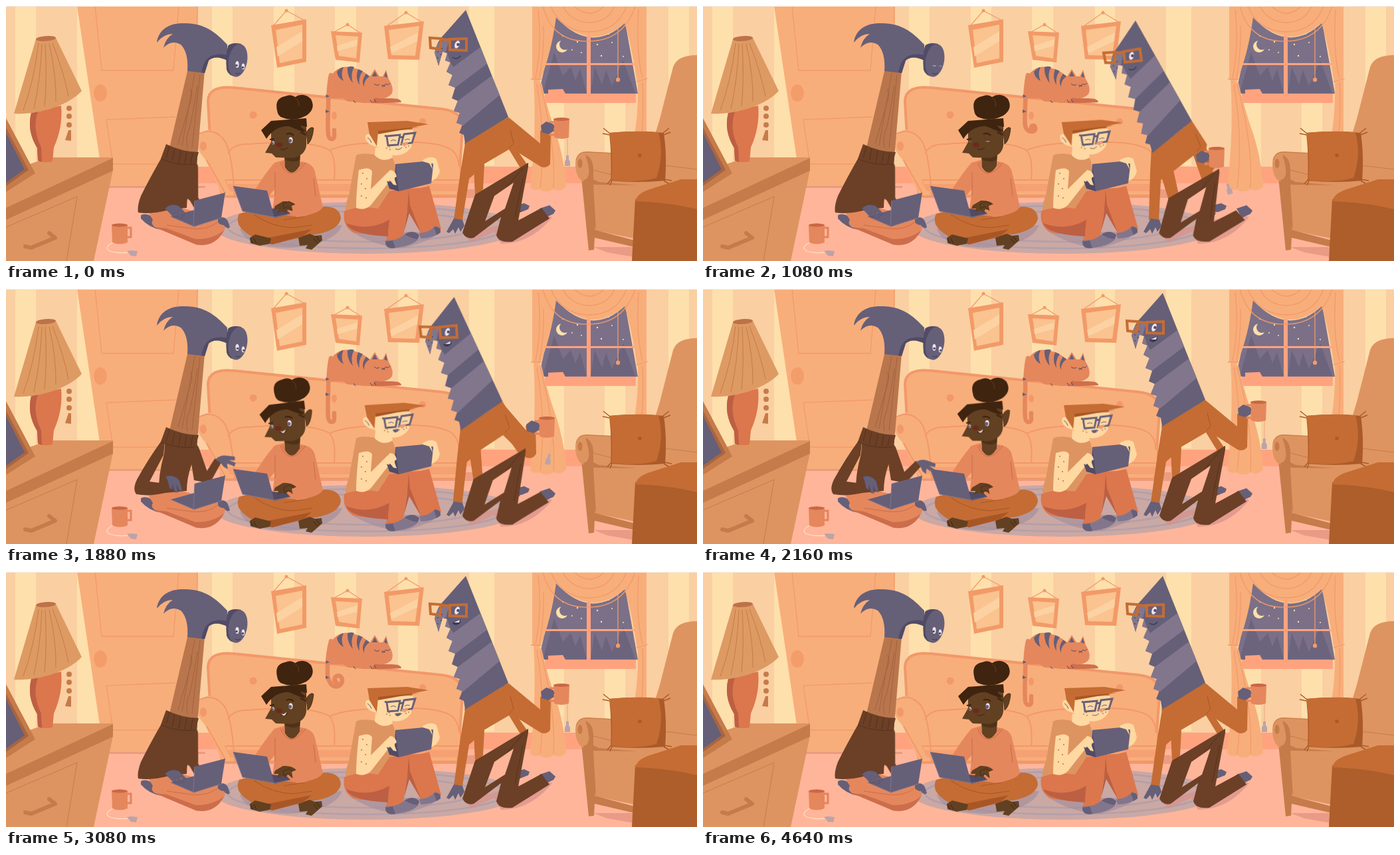
An HTML page that plays this animation: 1040x384 px, repeating every 4.8 s.

```html
<!DOCTYPE html>
<html lang="en">
<head>
<meta charset="utf-8">
<title>Evening in the living room</title>
<style>
html, body { margin: 0; width: 100%; height: 100%; overflow: hidden; background: #facfa1; }
svg { display: block; width: 100vw; height: 100vh; }
.p { fill: #665f78 } .pl { fill: #82768d } .pd { fill: #514b66 }
.br { fill: #6b4026 } .or { fill: #c46c33 } .co { fill: #dc764c } .cl { fill: #e5875c }
.tan { fill: #de9460 } .td { fill: #c67b4a } .sk { fill: #ffd8a2 }
.dk { fill: #624022 } .hair { fill: #3f2410 } .door, .sofa { fill: #f8ae7a }
.ln { fill: none; stroke: #f29a6b; stroke-width: 1.3 }
.thin { fill: none; stroke-width: 1 }
.w { fill: #eee4ef }

.lean, .hip, .prop, .flap, .arm, .cup, .cord, .grip, .tail, .nod, .tilt, .sleeve, .reach, .fore,
.paw, .tap, .blink, .wink, .talk, .smile, .grin, .look { animation: 4.8s infinite ease-in-out; }

.lean { transform-origin: 791px 323px; animation-name: lean; }
@keyframes lean { 0%, 13%, 43%, 100% { transform: none } 22%, 34.6% { transform: rotate(-7.6deg) } }
.hip { transform-origin: 750px 350px; animation-name: hip; }
@keyframes hip { 0%, 13%, 43%, 100% { transform: none } 22%, 34.6% { transform: skewX(5deg) scaleY(.92) } }
.prop { animation-name: prop; }
@keyframes prop {
  0%, 13%, 43%, 100% { d: path("M691 207L718 236L712 247L697 260L687 322L674 321L684 250Z") }
  22%, 34.6% { d: path("M675 214L708 236L703 250L689 262L686 324L671 322L673 250Z") }
}
.flap { animation-name: flap; }
@keyframes flap {
  0%, 13%, 43%, 100% { d: path("M704 240L720 238L718 276L706 289Z") }
  22%, 34.6% { d: path("M687 247L706 238L716 284L701 293Z") }
}
.arm { animation-name: arm; }
@keyframes arm {
  0%, 13%, 44%, 100% { d: path("M745 172L757 168L804 207L804 188L820 188L819 238Q814 245 805 242L757 212L740 200Z") }
  22.4% { d: path("M725 178L733 170L763 225L757 222L764 218L768 258Q764 270 752 265L738 225L720 210Z") }
  27%, 34.6% { d: path("M725 178L733 170L774 238L755 236L756 250L755 268Q748 275 738 268L738 235L720 210Z") }
  39.2% { d: path("M735 176L745 169L783 213L782 206L797 208L798 248Q793 257 783 254L748 220L730 205Z") }
}
.cup { animation-name: cup; }
@keyframes cup {
  0%, 13%, 44%, 100% { transform: none } 22.4% { transform: translate(-63px, 44px) }
  27%, 34.6% { transform: translate(-88px, 49px) } 39.2% { transform: translate(-22px, 24px) }
}
.cord { transform-origin: 845px 198px; animation-name: cord; }
@keyframes cord {
  0%, 13%, 46%, 100% { transform: none } 18% { transform: rotate(-20deg) } 22.4% { transform: rotate(-16deg) }
  27%, 34.6% { transform: rotate(10deg) } 39.2% { transform: rotate(11deg) }
}
.grip { animation-name: grip; }
@keyframes grip { 0%, 22.4%, 39.2%, 100% { transform: none } 27%, 34.6% { transform: translateX(20px) } }

.tail { animation-name: tail; }
@keyframes tail {
  0%, 12%, 30%, 50%, 80%, 100% { d: path("M489 104C485 122 485 140 485 156C484 176 484 184 485 194C486 203 496 202 494 193C494 191 494 189 494 187") }
  22%, 24%, 53.5% { d: path("M489 104C485 122 485 140 485 152C484 172 484 176 485 181C488 192 502 191 500 183C498 178 494 180 494 184") }
  62%, 68% { d: path("M489 104C485 120 484 130 484 141C484 152 483 158 486 163C491 178 507 173 506 162C503 149 488 160 498 167") }
}

.nod { transform-origin: 430px 242px; animation-name: nod; }
@keyframes nod { 0%, 35.5%, 47%, 100% { transform: none } 38.5%, 43% { transform: rotate(-2.6deg) } }
.tilt { transform-origin: 580px 225px; animation-name: tilt; }
@keyframes tilt { 0%, 13%, 47%, 100% { transform: none } 21%, 41% { transform: translate(-3px, -1px) rotate(-1.5deg) } }

.sleeve { animation-name: sleeve; }
@keyframes sleeve {
  0%, 24%, 62%, 100% { d: path("M240 220L232 232Q216 260 203 286Q197 302 199 311Q220 314 245 307L268 301L264 270L266 232Z") }
  29%, 58.5% { d: path("M240 220L233 230Q214 256 197 287Q190 302 196 309Q218 313 243 306L240 293L216 290L237 250Z") }
}
.reach { transform-origin: 279px 237px; animation-name: reach; }
@keyframes reach { 0%, 24%, 50%, 100% { transform: rotate(19deg) } 29%, 45% { transform: none } }
.fore { transform-origin: 299px 283px; animation-name: fore; }
@keyframes fore {
  0%, 24%, 51%, 100% { transform: rotate(75deg) } 29%, 35% { transform: none }
  38.5%, 43% { transform: translate(3px, 1px) rotate(-27deg) }
}
.paw { transform-origin: 252px 305px; animation-name: paw; }
@keyframes paw {
  0%, 3%, 6%, 9%, 12%, 24%, 62%, 65%, 68%, 100% { transform: none }
  1.5%, 4.5%, 7.5%, 10.5%, 63.5%, 66.5% { transform: translateY(-2px) rotate(-4deg) }
  28.5%, 37%, 43%, 58.5% { transform: translate(0, -16px) rotate(30deg) }
  40% { transform: translate(0, -17px) rotate(26deg) }
}
.key { animation: key .32s infinite step-end; }
.key.b { animation-delay: -.16s; }
@keyframes key { 0%, 100% { transform: none } 25% { transform: translate(1px, -1px) } 50% { transform: translate(0, -2px) } }
.tap { transform-origin: 576px 262px; animation-name: tap; }
@keyframes tap { 0%, 8%, 12%, 50%, 54%, 58%, 91%, 95%, 100% { transform: none } 10%, 52%, 56%, 93% { transform: rotate(-9deg) } }

.blink { transform-box: fill-box; transform-origin: 50% 60%; animation-name: blink; }
@keyframes blink { 0%, 21%, 24%, 86%, 89%, 100% { transform: none } 22%, 23%, 87%, 88% { transform: scaleY(.12) } }
.wink { transform-box: fill-box; transform-origin: 50% 60%; animation-name: wink; }
@keyframes wink { 0%, 6%, 9%, 84%, 87%, 100% { transform: none } 7%, 8%, 85%, 86% { transform: scaleY(.12) } }
.look { animation-name: look; }
@keyframes look { 0%, 25%, 50%, 100% { transform: none } 28%, 43% { transform: translateX(1.5px) } }
.talk, .smile, .grin { opacity: 0; animation-timing-function: step-end; }
.talk { animation-name: talk; }
@keyframes talk { 0%, 32%, 38%, 43% { opacity: 0 } 28%, 35%, 40% { opacity: 1 } }
.smile { animation-name: smile; }
@keyframes smile { 0%, 78% { opacity: 0 } 28% { opacity: 1 } }
.grin { animation-name: grin; }
@keyframes grin { 0%, 82% { opacity: 0 } 38% { opacity: 1 } }
</style>
</head>
<body>
<svg viewBox="0 0 1040 384" preserveAspectRatio="none">
<!-- wall and floor -->
<path fill="#facfa1" d="M0 0H1040V384H0Z"/>
<path fill="#fee0ac" d="M14 0H45V240H14ZM107 0H141V242H107ZM310 0H341V240H310ZM403 0H434V240H403ZM495 0H527V240H495ZM590 0H620V240H590ZM697 0H735V240H697ZM808 0H840V240H808ZM901 0H932V240H901ZM997 0H1028V240H997Z"/>
<path fill="#ffa37f" d="M0 242H1040V268H0Z"/>
<path fill="#ffb59a" d="M0 267H1040V384H0Z"/>

<!-- door -->
<path class="door" d="M107 0H289L284 271H147Z"/>
<path fill="#e99b7d" d="M147 271H300V274H147Z"/>
<path class="ln" d="M134 0L144 97H252L260 0M235 238H161L151 171L255 167M288 0L284 271"/>
<ellipse cx="142" cy="131" rx="10" ry="13" fill="#f39d6b"/>

<!-- pictures -->
<path class="ln" d="M402 30L422 7L450 22M492 40L514 28L534 41M572 31L602 10L627 25"/>
<g fill="#f29a68">
  <circle cx="422" cy="7" r="2.5"/><circle cx="514" cy="28" r="2.5"/><circle cx="602" cy="10" r="2.5"/>
  <path d="M399 29L452 20V84L408 93ZM489 38L536 40L532 85L496 81ZM569 30L629 23L622 81L575 80Z"/>
</g>
<path fill="#fac38f" d="M406 36L446 28V79L412 86ZM496 44L530 46L527 79L501 75ZM576 36L622 30L616 75L580 74Z"/>
<path fill="#fcd2a2" d="M407 62L446 38V53L409 76ZM498 60L529 50L528 60L499 68ZM578 62L620 40L619 53L580 71Z"/>

<!-- window -->
<path fill="#7b7087" d="M827 16Q880 74 932 25L951 132H802Z"/>
<path fill="#6c647d" d="M808 131L825 70L838 105L850 92L857 112L864 95L874 131ZM880 131L886 92L897 118L903 96L912 120L929 82L947 131Z"/>
<circle cx="837" cy="61" r="9" fill="#fee0ac"/><circle cx="841" cy="58" r="8" fill="#7b7087"/>
<g fill="#fee0ac"><circle cx="838" cy="45" r="1"/><circle cx="852" cy="66" r="1"/><circle cx="860" cy="54" r="1.2"/><circle cx="866" cy="70" r="1"/><circle cx="890" cy="58" r="1.2"/><circle cx="896" cy="75" r="1.2"/><circle cx="912" cy="55" r="1"/><circle cx="929" cy="76" r="1"/><circle cx="907" cy="42" r="1"/></g>
<path fill="#ffa37f" d="M874 44H880V132H874ZM806 86H947V89H806ZM811 132H948V146H811ZM816 126L838 125L842 132H816Z"/>
<path class="ln" d="M921 34V108"/><circle cx="921" cy="111" r="3.2" fill="#f29a6b"/>
<g class="door">
  <path d="M792 0H964V112L950 116Q942 60 931 26Q880 70 828 17Q820 75 803 114L792 110Z"/>
  <path d="M794 110L806 116Q816 160 829 195Q841 235 843 272Q834 281 824 276Q812 283 803 276Q795 279 789 273Q799 190 794 110Z"/>
  <path d="M951 112L964 110V241H936Q953 180 951 112Z"/>
</g>
<path class="ln" d="M808 0Q822 55 878 53Q930 52 947 0M820 0Q835 38 878 39Q920 38 934 0M838 0Q850 24 878 25Q906 24 916 0M855 0Q865 10 878 11Q892 10 900 0M801 5Q807 60 797 108M809 30Q810 70 803 108M952 5Q948 70 958 108M790 110H807M949 114L966 109M799 118Q813 200 804 274M804 118Q828 210 824 274M958 115Q962 190 948 241"/>

<!-- sofa -->
<path fill="#ec9c80" d="M330 276H705V289H330Z"/>
<path class="sofa" stroke="#f2986a" stroke-width="4" d="M308 215L304 143Q305 119 343 123L655 155Q688 158 687 184L680 286H326Z"/>
<path class="sofa" d="M287 200Q300 178 325 192Q343 205 344 285H326L300 231Q285 215 287 200Z"/>
<path fill="#f5a173" d="M328 261H682V279H337Z"/>
<path class="sofa" d="M332 262Q327 214 360 208Q430 201 495 211Q580 200 650 207Q678 210 683 240V268H332Z"/>
<path fill="none" stroke="#f2986a" stroke-width="2" d="M334 222Q342 207 365 208Q455 201 485 216Q497 224 494 262M488 217Q510 207 560 206Q645 201 670 216Q681 224 682 242M288 194Q311 181 327 200Q340 215 344 285M302 232L330 282M332 262H683"/>
<g fill="#f2986a"><ellipse cx="297" cy="211" rx="5" ry="7"/><circle cx="372" cy="164" r="5.5"/><ellipse cx="494" cy="165" rx="4" ry="6"/><circle cx="627" cy="174" r="5"/></g>

<!-- rug -->
<ellipse cx="543" cy="334" rx="229" ry="39" fill="#caa8a4"/>
<g class="thin" stroke="#b29faa" style="stroke-width:2.5"><ellipse cx="543" cy="333" rx="209" ry="32"/><ellipse cx="543" cy="332" rx="164" ry="23"/></g>
<path fill="#a28c9a" opacity=".6" d="M352 335Q360 364 430 364Q495 358 506 330ZM520 340Q560 364 600 364Q650 350 650 340ZM285 360Q318 361 330 335Z"/>
<path fill="#d9908a" opacity=".7" d="M690 345L700 356L735 340L745 358Q790 358 822 318L805 312Z"/>

<!-- cat -->
<path fill="#cf6f4c" d="M512 143Q550 148 595 145Q595 138 575 139L520 136Z"/>
<path class="cl" d="M485 138Q482 98 507 92Q526 89 548 106L555 95L562 106H567L572 96L576 110Q585 124 580 133Q570 142 556 138L550 146Q515 146 507 139Q490 140 485 138Z"/>
<path class="p" d="M498 99Q503 93 508 92Q503 102 508 113Q499 108 498 99ZM514 92Q520 90 524 92Q518 102 522 116Q513 106 514 92ZM530 95L537 98Q530 107 532 119Q525 108 530 95ZM542 102L547 106Q538 112 539 122Q534 113 542 102ZM551 106L555 98L559 106ZM569 106L572 99L574 108Z"/>
<path class="thin" stroke="#514b66" d="M554 117Q558 121 562 118M571 117Q575 120 578 116M565 119L571 121M571 118L566 122M523 142L526 146M548 141L551 146M554 140L557 145"/>
<path class="tail" fill="none" stroke="#e5875c" stroke-width="6.5" stroke-linecap="round" d="M489 104C485 122 485 140 485 156C484 176 484 184 485 194C486 203 496 202 494 193C494 191 494 189 494 187"/>
<path class="p" d="M481.500 133L487 136L481.500 138ZM481 156L487 159L481 161Z"/>

<!-- hammer -->
<g>
  <path fill="#b9764c" d="M274 94L299 97L288 228L244 222Z"/>
  <path class="thin" stroke="#a36340" d="M284 101L265 210M292 103L280 213M277 125Q282 132 278 142L259 208M288 120Q282 160 276 185Q270 196 273 214"/>
  <path class="p" d="M227 55C230 34 248 25 270 26C299 26 316 40 333 58L333 82Q315 73 305 82L299 101L273 98Q275 70 263 58Q249 50 237 63Q240 49 251 42Q237 42 227 55Z"/>
  <path class="pd" d="M333 74L333 82Q315 73 305 82L299 101L294 100Q298 78 312 74Q323 71 333 74Z"/>
  <path class="pd" d="M334 60Q340 54 354 57L347 106Q335 106 332 96Q330 76 334 60Z"/>
  <ellipse class="p" cx="349" cy="82" rx="14" ry="25" transform="rotate(10 349 82)"/>
  <g class="blink"><ellipse class="w" cx="348" cy="88" rx="2.600" ry="5"/><ellipse class="w" cx="357" cy="91" rx="2.300" ry="4.500"/><g class="look"><circle class="pd" cx="347" cy="89.500" r="1.800"/><circle class="pd" cx="356.500" cy="92.500" r="1.700"/></g></g>
  <path class="thin" stroke="#3f3a53" d="M345 101Q349 104 353 101"/>
  <ellipse class="talk w" cx="349" cy="102" rx="2.300" ry="1.500"/>

  <g class="reach">
    <path class="br" d="M274 231Q287 229 291 241L305 281L300 291L283 288Z"/>
    <g class="fore">
      <path class="br" d="M294 280L323 263L330 272L302 291Q294 292 294 280Z"/>
      <path class="p" d="M323 265Q332 261 342 268L351 274L349 279L341 275L348 283L344 287L336 278L333 286L329 280L328 273Z"/>
    </g>
  </g>
  <path class="p" d="M203 315Q214 310 224 322L234 337Q215 334 203 320Z"/>
  <path class="cl" d="M213 309Q245 296 285 310L325 319Q335 327 326 342Q308 365 285 359L224 333Q217 328 221 322Z"/>
  <path fill="#cc6d4b" d="M224 333L286 359Q315 364 328 338Q310 352 285 351L242 335Z"/>
  <path class="thin" stroke="#cc6d4b" d="M242 330L279 335Q302 338 318 326"/>
  <path class="p" d="M319 320Q329 315 334 324L337 333Q333 337 328 330Q323 330 319 326Z"/>
  <path class="br" d="M240 222L288 228Q288 242 280 262Q272 284 272 304L230 308Q229 280 238 248Z"/>
  <path class="sleeve br" d="M240 220L232 232Q216 260 203 286Q197 302 199 311Q220 314 245 307L268 301L264 270L266 232Z"/>
  <path class="br" d="M241 208Q266 220 290 220L285 238Q257 240 233 230Z"/>
  <path class="thin" stroke="#573219" d="M246 211L241 229M254 215L250 233M263 218L260 236M272 220L269 237M281 221L278 237M233 230Q257 241 285 238"/>
  <path class="p" d="M248 317L291 305L323 319L283 332Z"/>
  <path class="p" d="M284 293L330 281L324 319L282 332Z"/>
  <path class="thin" stroke="#82768d" d="M248 317L283 332L324 319M284 293L282 331"/>
  <path class="paw p" stroke="#514b66" stroke-width=".6" d="M239 305Q248 296 260 301L271 313L267 315L259 309L266 318L262 320L253 311L257 318L252 318L245 310Z"/>
</g>

<!-- woman -->
<g>
  <path class="cl" d="M404 236L421 231L443 234Q462 236 465 250L477 303Q474 316 440 318L400 318L405 275L390 293L374 278Q390 252 404 236Z"/>
  <path class="thin" stroke="#c86b49" d="M405 250V285M463 260L466 288L446 295M416 235Q427 260 447 236M413 236Q427 268 451 236"/>
  <path class="dk" d="M419 222H443L442 240Q431 260 420 243Z"/>
  <path class="hair" opacity=".55" d="M419 229L443 220L442 232Q431 237 419 231Z"/>
  <g class="nod">
    <path class="hair" d="M408 157Q404 139 420 136Q429 132 435 137Q448 129 459 140Q467 155 452 165Q432 175 416 168Q409 166 408 157Z"/>
    <path class="thin" stroke="#624022" d="M435 138Q443 145 440 151"/>
    <path class="dk" d="M399 178H452V210Q450 225 432 229L406 228L400 222L390 221L399 205Z"/>
    <path class="dk" stroke="#3f2410" stroke-width=".8" d="M452 190Q459 180 463 184Q461 203 454 208Z"/>
    <path class="hair" d="M384 187L399 173L452 169L453 182L443 180L450 191L426 181Q405 180 392 200Z"/>
    <path class="thin" stroke="#3f2410" style="stroke-width:2" d="M422 193Q428 190 433 195M397 201L404 200M444 184L451 188M443 190L451 194"/>
    <g class="blink"><ellipse class="w" cx="428.500" cy="202" rx="3" ry="4.500"/><ellipse class="w" cx="402" cy="206" rx="2" ry="2.600"/><circle class="p" cx="427.500" cy="203" r="2.700"/><circle class="p" cx="401.500" cy="206.500" r="1.800"/></g>
    <ellipse cx="411" cy="209" rx="5" ry="3.500" fill="#6c2a1a"/>
    <path class="thin" stroke="#3f2410" d="M413 215Q418 218 424 213"/>
    <path class="smile w" d="M414 213Q418 216 422 211Q421 217 417 216Z"/>
  </g>
  <path class="or" d="M351 313Q375 304 410 314L447 318L479 302Q503 302 504 320Q500 340 458 345L400 359Q361 348 350 329Q347 319 351 313Z"/>
  <path fill="#a95626" d="M400 348L460 336L448 346L401 359L374 351Z"/>
  <path class="thin" stroke="#a95626" d="M373 314Q400 333 432 334L461 330M418 322L450 317"/>
  <path class="dk" d="M375 344L399 350L397 358L382 361L368 357L367 349ZM440 349L457 343L465 346L475 345L476 353L460 367L451 365L454 360L442 361Z"/>
  <path class="thin" stroke="#3f2410" d="M368 350L372 358M373 350L377 358M467 347L472 354M463 350L469 357"/>
  <path class="p" d="M342 271L393 278L404 318L356 309Z"/>
  <path class="pd" d="M400 305L423 308L428 313L404 319Z"/>
  <path class="thin" stroke="#82768d" d="M342 271L356 309L404 318L428 313"/>
  <path class="key dk" d="M405 301L417 294Q430 293 437 300L434 309L424 307L421 312L416 309L408 312L410 306L403 306Z"/>
  <path class="key b dk" stroke="#3f2410" stroke-width=".6" d="M417 300L426 296L435 302L431 310L424 304L418 307Z"/>
  <path class="cl" d="M430 301L467 286L477 301Q475 313 437 318L432 312Z"/>
</g>

<!-- reader -->
<g>
  <path class="tan" d="M527 225Q536 220 555 224H577Q587 232 585 249L580 302L512 318Q508 305 516 285Z"/>
  <path class="sk" d="M556 213L580 217L582 228Q567 237 555 225Z"/>
  <path class="co" d="M509 309Q530 300 560 305L577 279L600 275L624 274L637 271L655 336L626 345L604 307L596 358L571 356L575 340Q545 347 521 340Q506 330 509 309Z"/>
  <path fill="#bd5f43" d="M575 340L577 322Q545 340 512 327Q518 344 575 347ZM606 278L604 308L599 340L607 312L624 341L608 300Z"/>
  <path class="pl" d="M571 353Q590 354 601 343Q613 336 622 345Q622 360 582 365Q570 365 571 353ZM622 342Q638 341 646 331Q654 333 654 341Q642 350 624 350Z"/>
  <path class="p" d="M571 355L582 353L586 364Q571 367 571 355ZM600 344Q612 336 622 345L619 351Q610 350 600 344ZM644 333Q655 331 654 341L648 345Z"/>
  <path class="sk" d="M531 247Q547 241 551 249L549 276L574 251L588 256L587 265L575 267L549 300Q539 309 527 304Q527 282 531 247Z"/>
  <g fill="#b9764c"><circle cx="537" cy="252" r="1"/><circle cx="543" cy="260" r="1"/><circle cx="535" cy="268" r="1"/><circle cx="541" cy="275" r="1"/><circle cx="535" cy="286" r="1"/><circle cx="542" cy="289" r="1"/></g>
  <path class="sk" d="M627 232Q641 224 648 231L653 249Q650 261 639 264Z"/>
  <path class="p" d="M586 238L640 233Q643 234 643 240L640 267L591 279Q584 277 585 268Z"/>
  <path class="pd" d="M586 238L591 279L577 275L573 263L585 264Z"/>
  <path class="tap sk" d="M571 255L578 247Q586 247 588 257L584 259L588 270L583 269L576 260L577 265L572 263Z"/>
  <path class="sk" d="M627 234Q633 227 646 230L650 238L640 237L642 246L637 237Z"/>
  <g class="tilt">
    <path class="sk" d="M557 186L613 184L610 212Q602 225 585 225Q567 223 558 212Q543 209 541 199Q541 190 549 194L556 204Z"/>
    <path class="or" d="M544 175L604 173L636 178L610 183L613 186Q575 187 560 190L558 211L547 193Z"/>
    <path fill="#a95626" d="M560 188L610 183L622 182L560 193Z"/>
    <path fill="none" stroke="#665f78" stroke-width="2.800" d="M573 196L593 194L590 209L575 210ZM599 193L616 191L611 206L595 208ZM592 198L598 197M570 195L574 197"/>
    <g class="thin" stroke="#665f78"><path d="M579 203Q583 200 587 203M600 202Q604 199 608 201M586 215Q591 218 596 213M544 198Q549 201 550 206"/></g>
    <path fill="#ef9c72" d="M594 207L607 205L600 212Z"/>
    <path class="grin p" d="M585 213L595 212Q592 218 588 217Z"/>
    <g fill="#b9764c"><circle cx="573" cy="214" r=".9"/><circle cx="578" cy="216" r=".9"/><circle cx="577" cy="212" r=".9"/><circle cx="602" cy="213" r=".9"/><circle cx="606" cy="211" r=".9"/></g>
  </g>
</g>

<!-- shark -->
<g>
  <path class="p" d="M764 301L780 297L788 301L786 306L776 310L766 311ZM803 305L818 300L827 308L824 313L811 319Z"/>
  <path class="arm or" d="M745 172L757 168L804 207L804 188L820 188L819 238Q814 245 805 242L757 212L740 200Z"/>
  <path class="flap or" d="M704 240L720 238L718 276L706 289Z"/>
  <g class="lean">
    <path class="or" d="M690 206L756 167L774 205L770 218L784 238L776 247L757 216L716 240L700 247Z"/>
    <path class="thin" stroke="#a95626" d="M759 187L764 207L757 214"/>
  </g>
  <g class="hip">
    <path class="br" d="M745 315L762 298H769L775 310L755 322Z"/>
    <path class="br" fill-rule="evenodd" d="M786 236L706 284L687 341Q692 352 704 349L745 318L738 345Q741 357 762 355L818 320L806 304L771 323L786 242ZM735 286L764 266L751 305L721 324Z"/>
    <path class="thin" stroke="#573219" d="M778 244L754 272M778 260L766 318"/>
  </g>
  <path class="prop or" d="M691 207L718 236L712 247L697 260L687 322L674 321L684 250Z"/>
  <path class="p" d="M674 320L687 322L690 331L684 340L681 333L676 343L673 336L667 342L663 340Z"/>
  <g class="lean">
    <path class="p" d="M692 6L756 167L691 207L689 194L682 191L687 179L678 176L683 161L674 158L680 143L671 139L676 123L666 119L672 104L663 99L669 85L661 82L664 71L657 69L651 90L645 70Q649 52 661 41Z"/>
    <path class="pl" d="M650 56L668 48L662 69L657 69L651 90L645 70ZM664 71L669 85L673 92L714 62L724 87L676 123L666 119L672 104L663 99L669 85L661 82ZM731 105L743 134L688 180L678 176L683 161L674 158L680 143Z"/>
    <g class="pd"><circle cx="650" cy="69" r="1"/><circle cx="655" cy="73" r="1"/><circle cx="650" cy="78" r="1"/><circle cx="656" cy="64" r="1"/></g>
    <g class="wink"><ellipse class="w" cx="679" cy="58" rx="3.500" ry="6" transform="rotate(20 679 58)"/><circle class="pd" cx="680.500" cy="58" r="2.300"/></g>
    <path class="thin" stroke="#3f3a53" style="stroke-width:1.500" d="M672 77Q679 82 684 75"/>
    <path class="grin" fill="#3f3a53" d="M672 76L684 71Q685 79 676 80Z"/>
    <path class="grin w" d="M674 76L683 72L682 76Z"/>
    <path fill="none" stroke="#c46c33" stroke-width="4" d="M638 48L655 49L653 65L639 63ZM668 50L693 49V67L668 66ZM655 50L668 51"/>
  </g>
  <g class="cup">
    <path class="cord" fill="none" stroke="#e9a77d" d="M845 198V229"/>
    <path class="cord" fill="#bca3a8" d="M843 225H847V231L849 234V241H841V234L843 231Z"/>
    <path fill="none" stroke="#e5835b" stroke-width="3" d="M827 175H819V194H827"/>
    <path class="grip p" d="M805 180L813 174L824 178L825 188L816 193L806 190Z"/>
    <path class="cl" d="M824 171Q836 166 848 170L847 198Q836 202 825 198Z"/>
    <ellipse cx="836" cy="170.500" rx="12" ry="2.500" fill="#c96745"/>
    <path class="p" d="M815 179L825 180L825 184L815 184Z"/>
  </g>
</g>

<!-- armchair -->
<path fill="#e99b86" d="M884 363H945V378L905 371Z"/>
<path class="tan" d="M967 226L984 170L1004 92Q1010 74 1040 74V300H967Z"/>
<path fill="#c67b4a" d="M866 258L890 270L885 367L877 368Z"/>
<path class="tan" d="M857 237Q858 218 875 219L984 225L1040 245V350H945L888 338L870 265Q857 260 857 237Z"/>
<path class="td" d="M872 224Q884 229 884 247V261L892 265L950 270L884 269L888 338L881 315L869 262Q884 260 872 224ZM886 337L946 353V363L886 349Z"/>
<ellipse class="td" cx="864" cy="237" rx="3.500" ry="7"/>
<path class="thin" stroke="#c67b4a" d="M858 232Q861 220 874 220L985 225M884 247L911 254M991 240L1040 246"/>
<path fill="#aa5a28" d="M908 191Q950 187 990 191Q995 225 992 263Q950 267 910 263Q912 225 908 191Z"/>
<path class="or" d="M908 191Q950 187 982 190Q991 225 979 259Q950 267 911 262Q914 225 908 191Z"/>
<path class="thin" stroke="#aa5a28" style="stroke-width:1.500" d="M909 192L899 184M908 194L898 192M989 191L998 184M990 194L1000 190M911 261L905 268M912 263L909 270M991 261L1002 263M990 263L1000 269"/>
<circle cx="954" cy="225" r="2.800" fill="#aa5a28"/>
<path fill="#ad5e2a" d="M947 291L1040 300V384H942Z"/>
<path class="or" d="M947 294Q950 282 969 276L1016 261H1040V306Q1000 296 947 294Z"/>

<!-- desk -->
<path class="tan" d="M0 250L65 228H161V247L132 384H0Z"/>
<path class="td" d="M161 229V248L0 322V304Z"/>
<path class="thin" stroke="#c67b4a" d="M0 333L107 287L91 384"/>
<path fill="none" stroke="#c67b4a" stroke-width="6" stroke-linecap="round" stroke-linejoin="round" d="M29 362L38 364L74 349L65 342"/>
<path class="td" d="M0 169L44 252L0 280Z"/>
<path fill="#a96540" d="M0 183L34 247L0 271Z"/>
<path class="p" d="M0 191L28 246L0 266Z"/>

<!-- lamp -->
<path class="co" d="M38 161Q61 154 83 150Q86 182 72 213L70 234Q59 237 48 233L47 214Q31 188 38 161Z"/>
<path fill="#bd5f43" d="M38 161L48 159Q39 185 53 213L54 235L48 233L47 214Q31 188 38 161Z"/>
<path fill="#de9a63" d="M45 50Q60 43 75 48L114 128C94 149 52 164 12 162Z"/>
<ellipse cx="60" cy="49" rx="15" ry="3.800" fill="#bd7248" transform="rotate(-4 60 49)"/>
<path class="thin" stroke="#c67b4a" d="M49 56Q43 110 26 157M54 57Q52 110 42 155M59 57Q62 110 58 151M65 57Q76 105 75 144M70 56Q88 103 94 136"/>
<g class="td"><circle cx="95" cy="154" r="4"/><circle cx="95" cy="166" r="4"/><circle cx="95" cy="179" r="4"/><path d="M94 187H98V203L89 202Z"/></g>

<!-- mug -->
<path fill="none" stroke="#ffe0c0" stroke-width="1.300" d="M165 354Q145 363 156 369Q168 373 184 371"/>
<path fill="#bca3a8" d="M182 369L188 368L198 369L196 377L188 376Z"/>
<path fill="none" stroke="#e5835b" stroke-width="3" d="M182 334H188V348H182"/>
<path class="cl" d="M159 330Q171 325 183 330V356Q171 361 160 356Z"/>
<ellipse cx="171" cy="330" rx="12" ry="2.500" fill="#c96745"/>

<path fill="#f6e9dc" d="M0 0H1040V1H0Z"/>
</svg>
</body>
</html>
```
